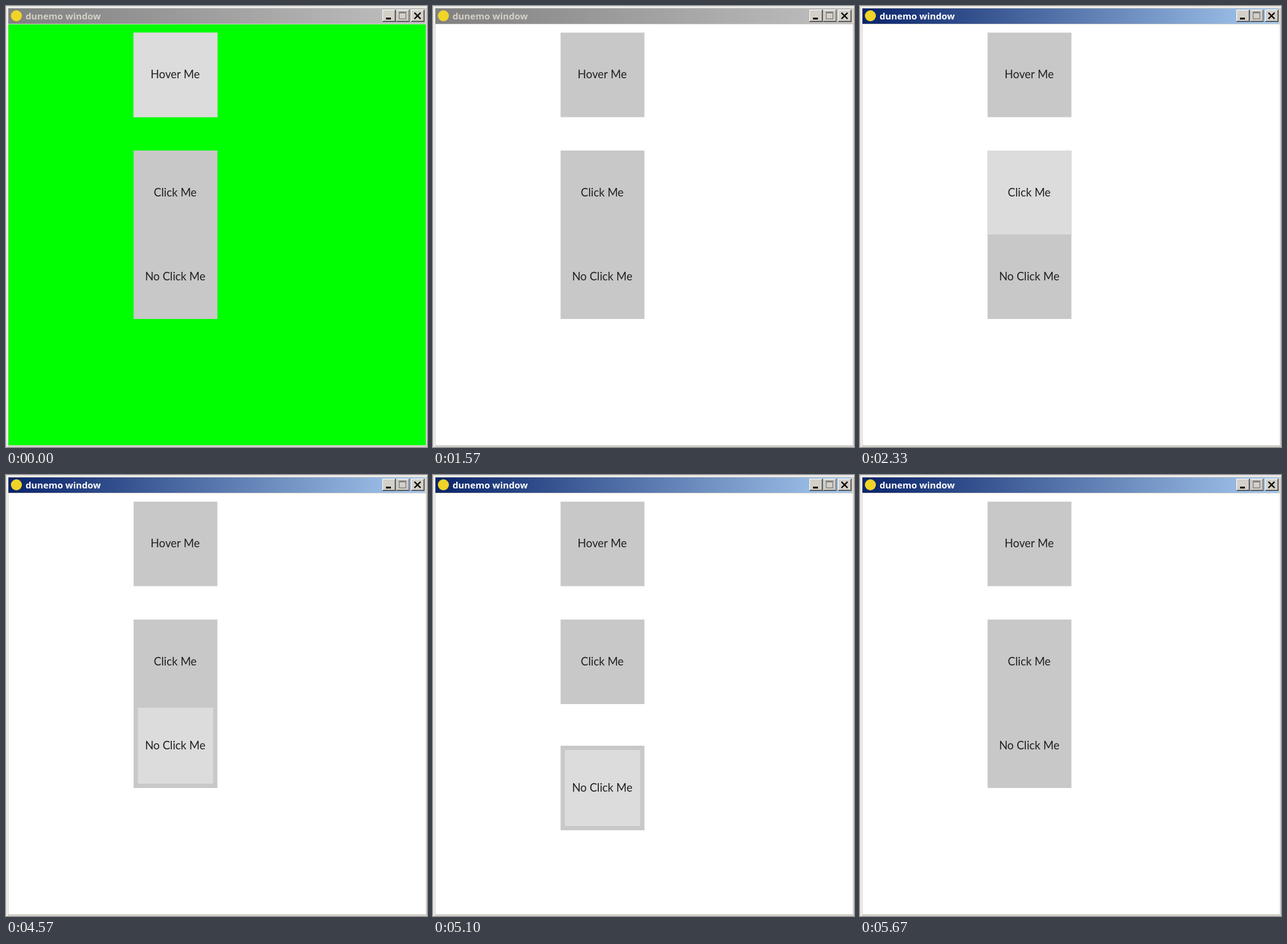
An HTML page with a canvas for the animation above (6.31 s loop, 688x720 px).

```html
<!DOCTYPE html>
<html lang="en">
<head>
<meta charset="utf-8">
<style>
  html, body { margin: 0; overflow: hidden; }
  canvas { display: block; }
</style>
</head>
<body>
<canvas id="stage" width="688" height="720"></canvas>
<script>
const ctx = document.getElementById('stage').getContext('2d');
const LOOP = 6310;
const FACE = '#d4d0c8', SHADOW = '#808080', BASE = '#c8c8c8', HOVER = '#dcdcdc';

function rect(x, y, w, h, color) {
  ctx.fillStyle = color;
  ctx.fillRect(x, y, w, h);
}

function text(str, x, y, font, color, align) {
  ctx.font = font;
  ctx.fillStyle = color;
  ctx.textAlign = align;
  ctx.fillText(str, x, y);
}

function gradient(from, to) {
  const g = ctx.createLinearGradient(4, 0, 684, 0);
  g.addColorStop(0, from);
  g.addColorStop(1, to);
  return g;
}

const ACTIVE = gradient('#0a246a', '#a6caf0');
const INACTIVE = gradient('#808080', '#c0c0c0');

// Raised window-control box
function control(x) {
  rect(x, 6, 22, 20, '#404040');
  rect(x, 6, 21, 19, '#fff');
  rect(x + 1, 7, 20, 18, SHADOW);
  rect(x + 1, 7, 19, 17, FACE);
}

function drawWindow(active) {
  rect(0, 0, 688, 720, FACE);
  rect(1, 1, 687, 1.5, '#fff');
  rect(1, 1, 1.5, 719, '#fff');
  rect(4, 4, 680, 25, active ? ACTIVE : INACTIVE);

  ctx.fillStyle = '#f0d428';
  ctx.beginPath();
  ctx.arc(17, 16, 9, 0, Math.PI * 2);
  ctx.fill();
  text('dunemo window', 32, 22, 'bold 14.8px "Open Sans", sans-serif',
    active ? '#fff' : FACE, 'left');

  [615, 637.5, 662].forEach(control);
  rect(621, 19, 8, 3, '#000');
  ctx.strokeStyle = SHADOW;
  ctx.lineWidth = 1.4;
  ctx.strokeRect(642.5, 10, 11, 11);
  rect(642, 9.5, 12, 2.5, SHADOW);
  ctx.strokeStyle = '#000';
  ctx.lineWidth = 2.2;
  ctx.beginPath();
  ctx.moveTo(667.5, 11); ctx.lineTo(677.5, 21);
  ctx.moveTo(677.5, 11); ctx.lineTo(667.5, 21);
  ctx.stroke();
}

function button(label, y, hovered, border = 0) {
  rect(208.5, y, 137, 138, BASE);
  if (hovered) rect(208.5 + border, y + border, 137 - 2 * border, 138 - 2 * border, HOVER);
  text(label, 276.5, y + 74.5, '18.3px Lato, sans-serif', '#202020', 'center');
}

// Four equal jumps spread over 170 ms, the first one at `start`
const slide = (t, start) =>
  t < start ? 0 : Math.min(4, 1 + Math.floor((t - start) / 56.6)) / 4;

function draw(t) {
  const within = (from, to) => t >= from && t < to;
  const background = t < 1530 ? '#0f0' : within(2970, 3630) ? '#f00' : '#fff';
  drawWindow(t >= 2270);
  rect(4, 30, 682, 687, background);

  button('Hover Me', 43.5, t < 1530);
  button('Click Me', 236, within(1600, 4530));
  const offset = Math.round(69 * (slide(t, 4930) - slide(t, 5500)));
  button('No Click Me', 373 + offset, within(4530, 5500), 7);
}

const started = performance.now();
function frame() {
  draw((performance.now() - started) % LOOP);
  requestAnimationFrame(frame);
}
frame();
</script>
</body>
</html>
```
